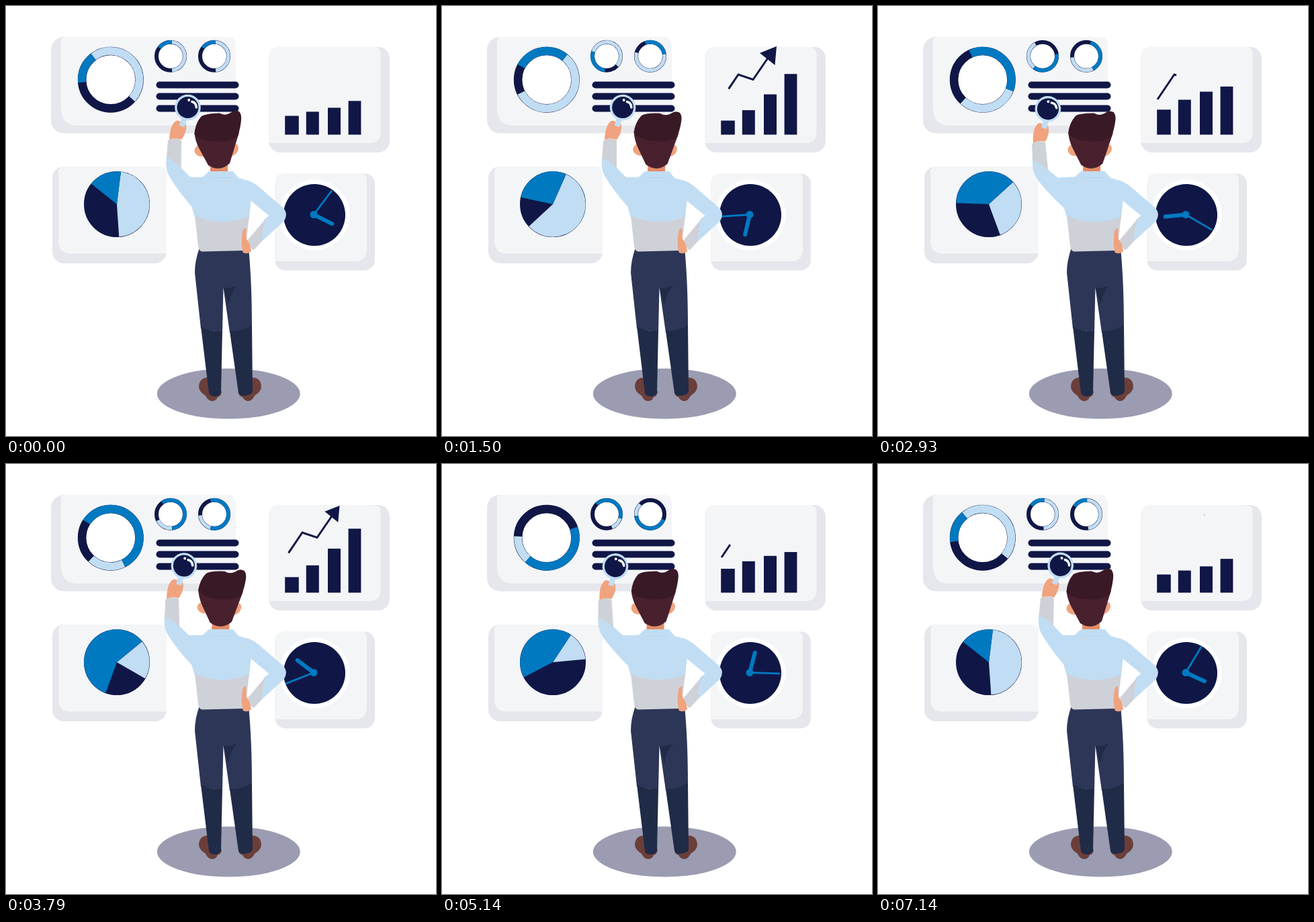
These frames come from a looping animation (640 by 640 pixels, 7.21 s). An HTML page:

```html
<!DOCTYPE html>
<html lang="en">
<head>
<meta charset="utf-8">
<title>Dashboard review</title>
<style>
  html, body { margin: 0; width: 100%; height: 100%; overflow: hidden; background: #fff; }
  svg { display: block; width: 100%; height: 100%; }
  .edge { fill: #e6e7ec; }
  .face { fill: #f4f5f7; }
  .navy { fill: #101746; }
  .sky { fill: #c1ddf3; }
  .grey { fill: #cfd1d8; }
  .skin { fill: #f0a37e; }
  .pants { fill: #2d3657; }
  .shade { fill: #202b47; }
  .shoe { fill: #6b3e3a; }
  .hand { stroke: #0079c1; stroke-linecap: round; }
</style>
</head>
<body>
<svg viewBox="0 0 640 640">
  <!-- cards -->
  <rect class="edge" x="67" y="46" width="275" height="143.5" rx="19"/>
  <path class="face" d="M88 46H329Q342 46 342 59V178H107Q82 178 82 153V52Q82 46 88 46Z"/>
  <rect class="edge" x="391" y="61" width="180" height="157" rx="17"/>
  <path class="face" d="M407 61H546Q557.500 61 557.500 72V187Q557.500 204 541 204H391V77Q391 61 407 61Z"/>
  <rect class="edge" x="69" y="239" width="170" height="144" rx="17"/>
  <path class="face" d="M87 239H228Q239 239 239 250V368.500H96Q78 368.500 78 350V248Q78 239 87 239Z"/>
  <rect class="edge" x="400.500" y="249.500" width="148.500" height="144" rx="15"/>
  <path class="face" d="M414 249.500H528Q537 249.500 537 258V362Q537 380 519 380H400.500V263Q400.500 249.500 414 249.500Z"/>

  <g id="charts"></g>
  <g class="navy">
    <rect x="223.500" y="112.500" width="123" height="10" rx="5"/>
    <rect x="223.500" y="129.500" width="123" height="10" rx="5"/>
    <rect x="223.500" y="147.500" width="123" height="10" rx="5"/>
  </g>
  <g id="bars" class="navy"></g>
  <path id="trend" d="M416 139L441 102L463 109.500L486 76" pathLength="1" fill="none" stroke="#101746" stroke-width="3"/>
  <path id="arrowhead" class="navy" d="M13 -17L-12 -7L10.500 11Z"/>

  <!-- clock -->
  <circle cx="459" cy="311" r="52.500" fill="#fff"/>
  <circle class="navy" cx="459" cy="311" r="46"/>
  <g transform="translate(458 310.500)">
    <path id="hour" class="hand" d="M0 0V-30.500" stroke-width="6"/>
    <path id="minute" class="hand" d="M0 0V-44" stroke-width="2.800"/>
    <circle r="5.500" fill="#0079c1"/>
  </g>

  <!-- legs -->
  <ellipse cx="331.300" cy="577" rx="106.500" ry="37.500" fill="#9b9cb1"/>
  <path class="shoe" d="M287 566Q288 553 301 553L321 574Q320 581 315 582Q313 588 306 588Q300 587 297 580Q287 574 287 566Z"/>
  <path class="shoe" d="M380 566Q379 553 366 553L346 575Q347 581 352 582Q355 588 361 588Q367 587 370 580Q380 574 380 566Z"/>
  <path class="pants" d="M288 360Q281 379 281 397L290 480L322 486L323.500 419L333 486L366 480Q366 410 361 360Z"/>
  <path class="shade" d="M290 477Q304 485 322 484L320 576Q317 581 311 581Q303 581 302 576Z"/>
  <path class="shade" d="M333 484Q352 484 366 475L367 574Q365 579 356 580Q348 581 346 576Z"/>
  <path class="shade" d="M324 420Q335 420 344 416Q333 428 331 446Z"/>

  <!-- raised arm with magnifier -->
  <g id="arm">
    <path class="sky" d="M239 223Q237 241 241 249Q250 268 281 304L300 308L298 256L274 254.500L260 240V225Z"/>
    <path class="grey" d="M241 200Q250 194 261 200L260.500 242Q251 230 239 226Z"/>
    <path class="skin" d="M243 199Q244 177 253 171Q258 169 261 174L268 176Q270 187 261 199Q251 195 243 199Z"/>
    <path d="M267 164L261.500 179" stroke="#c1ddf3" stroke-width="8"/>
    <circle class="sky" cx="270.500" cy="151" r="19.300"/>
    <circle class="navy" cx="270.500" cy="151" r="16"/>
    <circle cx="272.200" cy="140" r="2" fill="#fff"/>
    <path d="M277 142.500Q283 144 283.300 151" fill="none" stroke="#fff" stroke-width="3.500" stroke-linecap="round"/>
  </g>

  <!-- head -->
  <g id="head">
    <path d="M304 228H330V256H304Z" fill="#e38b66"/>
    <path class="skin" d="M286 207Q279 211 281 218Q285 225 294 224V207Z"/>
    <path class="skin" d="M339 206Q345 204 346 211Q346 220 335 224Z"/>
    <path fill="#48202e" d="M280.500 188Q281 200 288 213L301 237Q318 248 333 234L347 188Z"/>
    <path fill="#3a1927" d="M280.500 191Q281 176 290 165Q295 160 318 159.500Q326 164 334 159Q340 153.500 347 157Q351 161 350 170Q349 181 345 194Q332 203 311 201.500Q288 200 280.500 191Z"/>
  </g>

  <!-- torso and resting arm -->
  <path class="skin" d="M352 336Q355 328 358 332L358 347Q364 353 365 365Q360 370 353 367Q349 356 352 336Z"/>
  <path class="sky" d="M272 255L293 254.500L302 246H338L346 256L361 260Q367 262 375 268L411 299Q421 308 414 320L380 351L384 318L391.500 312L364.500 290L362 316Q322 330 281 315Q272 288 272 255Z"/>
  <path d="M303 255.500H337" stroke="#b4d4ee" stroke-width="0.800"/>
  <path class="grey" d="M281 312Q300 321 321 321.500Q345 321 362 313L358 346Q352 341 354 364L292 365.500Q287 365 286 357Z"/>
  <path class="grey" d="M387 316Q381 330 381 350L369 363Q365 364 360 348Z"/>
  <path class="skin" d="M352 336Q355 328 357.500 332L357.500 347Q364 353 364 365Q360 370 353 367Q349 356 352 336Z"/>
</svg>

<script>
const DURATION = 7210, STEPS = 101, TAU = 2 * Math.PI;
const $ = id => document.getElementById(id);
const rad = deg => deg * Math.PI / 180;
const ease = f => (1 - Math.cos(Math.PI * Math.min(1, Math.max(0, f)))) / 2;

function add(parent, tag, attrs) {
  const node = document.createElementNS("http://www.w3.org/2000/svg", tag);
  for (const name in attrs) node.setAttribute(name, attrs[name]);
  return parent.appendChild(node);
}

// Shares of the circle, eased between six evenly spaced keys.
const SKY_SHARE = [0.469, 0.6, 0.4, 0.2, 0.1, 0.3];
const BLUE_SHARE = [0.162, 0.3, 0.2, 0.6, 0.4, 0.49];
function share(keys, u) {
  const pos = u * keys.length, i = Math.floor(pos) % keys.length;
  const from = keys[i], to = keys[(i + 1) % keys.length];
  return 360 * (from + (to - from) * ease(pos % 1));
}

function makeChart(cx, cy, outer, inner, turn) {
  const ring = (color, trim) => add($("charts"), "circle", {
    cx, cy, r: (outer + inner) / 2, pathLength: 360, stroke: color,
    "stroke-width": outer - inner - trim, fill: "none"
  });
  if (inner) add($("charts"), "circle", { cx, cy, r: inner + 1, fill: "#fff" });
  ring("#101746", 0);
  const sky = ring("#c1ddf3", 0.8), blue = ring("#0079c1", 0.4);
  const setArc = (arc, start, span) => {
    arc.setAttribute("stroke-dasharray", `${span} 360`);
    arc.setAttribute("transform", `rotate(${start - 90} ${cx} ${cy})`);
  };
  return u => {
    const angle = turn(u), blueSpan = share(BLUE_SHARE, u);
    setArc(sky, angle, share(SKY_SHARE, u));
    setArc(blue, angle - blueSpan, blueSpan);
  };
}

const charts = [
  makeChart(155.8, 109.7, 49, 36.4, u => 360 * u - 37),
  makeChart(245, 74.7, 24, 18, u => 5 - 360 * u),
  makeChart(310, 74.7, 24, 18, u => 5 + 360 * u),
  makeChart(165, 295, 49, 0, u => 7 + 22 * (1 - Math.cos(TAU * u)))
];

const BASELINE = 191.5;
const bars = [
  { x: 415.2, width: 20.6, mid: 163.5, swing: 9.3 },
  { x: 446.8, width: 19, mid: 150.5, swing: 13.7 },
  { x: 479, width: 19, mid: 135, swing: 19 },
  { x: 509.6, width: 18.8, mid: 117, swing: 24.3 }
].map(bar => ({ ...bar, node: add($("bars"), "rect", { x: bar.x, width: bar.width }) }));

function rotate(id, angle, cx = 0, cy = 0) {
  $(id).setAttribute("transform", `rotate(${angle} ${cx} ${cy})`);
}

function draw(u) {
  const beat = (u * 3) % 1, phase = TAU * beat;
  charts.forEach(update => update(u));

  bars.forEach(({ node, mid, swing }, i) => {
    const top = mid - swing * Math.sin(phase - rad(30 * i));
    node.setAttribute("y", top);
    node.setAttribute("height", BASELINE - top);
  });

  const start = ease(beat * 2 - 1), end = ease(beat * 2);
  $("trend").setAttribute("stroke-dasharray", `${end - start} 2`);
  $("trend").setAttribute("stroke-dashoffset", -start);
  const size = ease((beat - 0.4) / 0.24) * ease((1 - beat) / 0.2);
  $("arrowhead").setAttribute("transform", `translate(485 77) scale(${size})`);

  rotate("hour", 116.5 + 360 * u);
  rotate("minute", 37 + 1080 * u);
  rotate("head", 1.95 * (1 - Math.cos(phase)), 318, 280);
  rotate("arm", -5 * (Math.sin(phase - rad(28)) + Math.sin(rad(28))), 282, 308);
}

function frame(now) {
  const step = Math.min(STEPS - 1, Math.floor((now % DURATION + 10) * STEPS / DURATION));
  // Every step after the first shows the pose slightly past its start.
  draw(step ? (step + 0.45) / STEPS : 0);
  requestAnimationFrame(frame);
}
requestAnimationFrame(frame);
</script>
</body>
</html>
```
